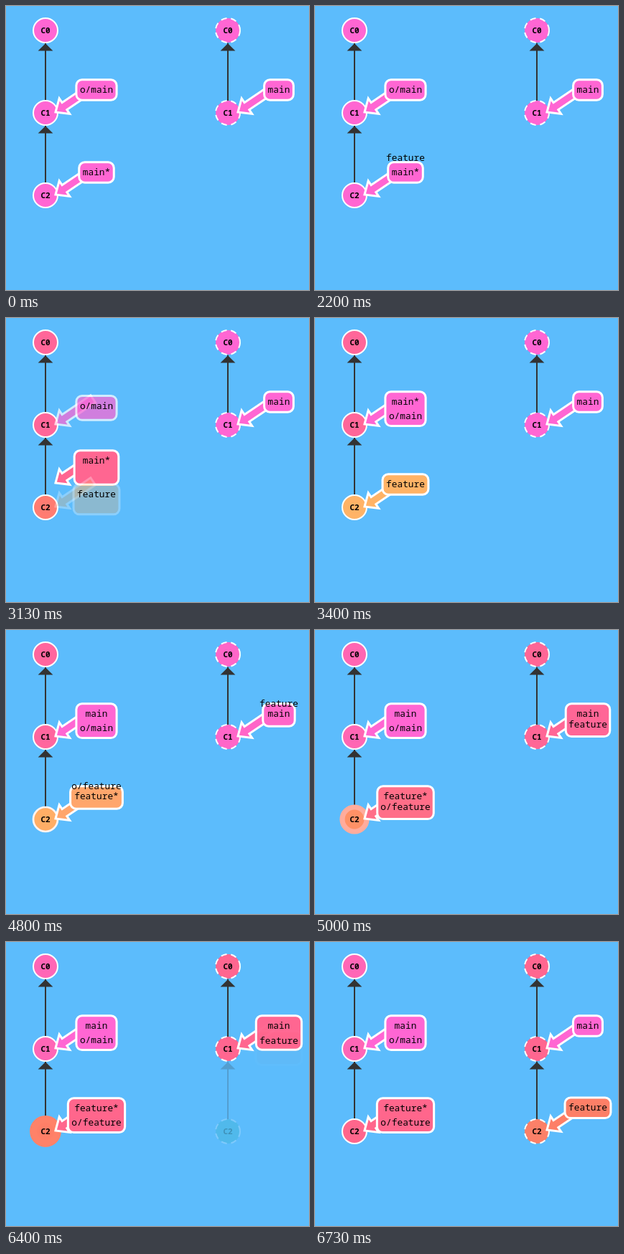
An HTML page for the animation above (8390 ms loop, 422 px wide and 396 px high).

```html
<!DOCTYPE html>
<html lang="en">
<head>
<meta charset="utf-8">
<title>Commit graph</title>
<style>
  html, body { margin: 0; width: 100%; height: 100%; overflow: hidden; background: #5cbcfc; }
  svg { display: block; }
  text { font-family: "Noto Sans Mono", "DejaVu Sans Mono", monospace; text-anchor: middle; }
  .tag { font-size: 12.83px; }
  .id { font-size: 11px; font-weight: 700; }
  .edge { fill: #333; stroke: #333; stroke-width: 2; }
  .label { stroke: #fff; stroke-width: 3; }
</style>
</head>
<body>
<svg id="stage" width="422" height="396" viewBox="0 0 422 396"></svg>
<script>
const LOOP = 8390, TICK = 1000 / 15;
const MOVE = 400, HIGHLIGHT = 528, BIRTH = 800;
const TOP = 34, ROW = 115, RADIUS = 17, LINE = 19.4, CHAR = 7.7;
const WHITE = [255, 255, 255], ORPHAN = [36, 178, 178];
const REPO_X = { local: 55, remote: 309 };
const HUES = {
  local: { main: 317.4, 'o/main': 317.4, feature: 30, 'o/feature': 300 },
  remote: { main: 317.4, feature: 10 }
};

// Branch stacks per commit, oldest commit first.
const steps = [
  { at: 0, local: [[], ['o/main'], ['main*']], remote: [[], ['main']] },
  { at: 2180, local: [[], ['o/main'], ['main*', 'feature']] },
  { at: 2985, local: [[], ['main*', 'o/main'], ['feature']] },
  { at: 3830, local: [[], ['main', 'o/main'], ['feature*']] },
  { at: 4690, shown: 4790, lit: true,
    local: [[], ['main', 'o/main'], ['feature*', 'o/feature']], remote: [[], ['main', 'feature']] },
  { at: 5518, shown: 5660, lit: true, remote: [[], ['main', 'feature'], []] },
  { at: 6360, remote: [[], ['main'], ['feature']] }
];
steps.forEach((step, i) => {
  const before = steps[i - 1];
  step.local ??= before.local;
  step.remote ??= before.remote;
  step.shown ??= step.at;
  step.pose = pose(step);
});

function rgb(hue) {
  return [5, 3, 1].map(n => {
    const k = (n + hue / 60) % 6;
    return 255 * (1 - 0.6 * Math.max(0, Math.min(k, 4 - k, 1)));
  });
}

function blend(hues) {
  if (!hues.length) return ORPHAN;
  const sum = fn => hues.reduce((total, h) => total + fn(h * Math.PI / 180), 0);
  return rgb((Math.atan2(sum(Math.sin), sum(Math.cos)) * 180 / Math.PI + 360) % 360);
}

function pose(step) {
  const result = { edges: {}, nodes: {}, labels: {} };
  for (const repo in REPO_X) {
    const x = REPO_X[repo];
    const bare = text => text.replace('*', '');
    const huesOf = stack => stack.map(text => HUES[repo][bare(text)]);
    step[repo].forEach((stack, row) => {
      const y = TOP + ROW * row;
      const key = repo + row;
      const hues = huesOf(step[repo].slice(row).flat());
      const opacity = hues.length ? 1 : 0.2;
      const lit = step.lit && key === 'local2';
      const glow = rgb(HUES.remote.feature);
      result.nodes[key] = {
        x, y, opacity, id: 'C' + row, dash: repo === 'remote' ? '8 6' : 'none',
        fill: lit ? glow : blend(hues), stroke: lit ? glow : WHITE, width: lit ? 10 : 2
      };
      if (row) result.edges[key] = { x, opacity, tail: y - RADIUS, head: y - ROW + RADIUS * 1.15 };

      const w = Math.max(...stack.map(text => text.length)) * CHAR + 10;
      stack.forEach((text, i) => {
        result.labels[repo + bare(text)] = {
          x, y, w, text, h: 9 + LINE * stack.length,
          top: y - 46.2 + LINE * i, textY: y - 27.9 + LINE * i,
          opacity: i ? 0 : 1, fill: blend(huesOf(i ? [text] : stack))
        };
      });
    });
  }
  return result;
}

function mix(a, b, p) {
  if (typeof b === 'number') return a + (b - a) * p;
  if (Array.isArray(b)) return b.map((value, i) => mix(a[i], value, p));
  if (typeof b === 'object') {
    return Object.fromEntries(Object.keys(b).map(key => [key, mix(a[key], b[key], p)]));
  }
  return b;
}

function easeInOut(n) {
  if (n >= 1) return 1;
  const q = 0.48 - n / 1.04, r = Math.sqrt(0.1734 + q * q);
  const t = Math.cbrt(r - q) + Math.cbrt(-r - q) + 0.5;
  return 3 * (1 - t) * t * t + t * t * t;
}

function bounce(n) {
  if (n >= 1) return 1;
  const s = 7.5625, d = 2.75;
  if (n < 1 / d) return s * n * n;
  if (n < 2 / d) return s * (n - 1.5 / d) ** 2 + 0.75;
  if (n < 2.5 / d) return s * (n - 2.25 / d) ** 2 + 0.9375;
  return s * (n - 2.625 / d) ** 2 + 0.984375;
}

const css = color => `rgb(${color.map(Math.round)})`;

function drawEdge({ x, tail, head, opacity }) {
  return `<path class="edge" opacity="${opacity}" d="M${x} ${tail}
    C${x} ${tail - 50} ${x} ${head + 50} ${x} ${head} l-8 8h16l-8-8
    C${x} ${head + 50} ${x} ${tail - 50} ${x} ${tail}"/>`;
}

function drawNode({ x, y, id, fill, stroke, width, dash, opacity }) {
  return `<circle cx="${x}" cy="${y}" r="${RADIUS}" fill="${css(fill)}" stroke="${css(stroke)}"
    stroke-width="${width}" stroke-dasharray="${dash}" opacity="${opacity}"/>
    <text class="id" x="${x}" y="${y + 4}" opacity="${opacity}">${id}</text>`;
}

function drawLabel({ x, y, w, h, top, fill, opacity }) {
  const paint = `class="label" fill="${css(fill)}" opacity="${opacity}"`;
  return `<path ${paint} d="M0 0L15-13V-6H63V6H15V13Z"
    transform="translate(${x + 14} ${y - 1}) rotate(-34)"/>
    <rect ${paint} x="${x + 71 - w / 2}" y="${top}" width="${w}" height="${h}" rx="8"/>`;
}

function drawText({ x, textY, text }) {
  return `<text class="tag" x="${x + 71}" y="${textY}">${text}</text>`;
}

function sceneAt(time) {
  const index = steps.findLastIndex(step => time >= step.shown);
  const { at, pose: now } = steps[index];
  const before = steps[Math.max(0, index - 1)].pose;
  const progress = span => index ? easeInOut((time - at) / span) : 1;
  const tween = (kind, birth, pace) => Object.entries(now[kind]).map(([key, end]) => {
    const start = before[kind][key];
    return mix(start ?? { ...end, ...birth(end) }, end, pace(key, !start));
  });
  return {
    edges: tween('edges', e => ({ tail: e.tail - ROW, opacity: 0 }), () => progress(MOVE)),
    nodes: tween('nodes', n => ({ y: n.y - ROW, opacity: 0 }), (key, born) =>
      born ? bounce((time - at) / BIRTH)
        : progress(steps[index].lit && key === 'local2' ? HIGHLIGHT : MOVE)),
    labels: tween('labels', l => ({ textY: l.y - 47.9 }), () => progress(MOVE))
  };
}

const stage = document.getElementById('stage');
const startTime = performance.now();
let lastTick = -1;

function frame() {
  const elapsed = (performance.now() - startTime) % LOOP;
  const tick = Math.floor((elapsed + 5) / TICK);
  if (tick !== lastTick) {
    lastTick = tick;
    const { edges, nodes, labels } = sceneAt(tick * TICK);
    stage.innerHTML = [
      ...edges.map(drawEdge), ...nodes.reverse().map(drawNode),
      ...labels.map(drawLabel), ...labels.map(drawText)
    ].join('');
  }
  requestAnimationFrame(frame);
}
frame();
</script>
</body>
</html>
```
